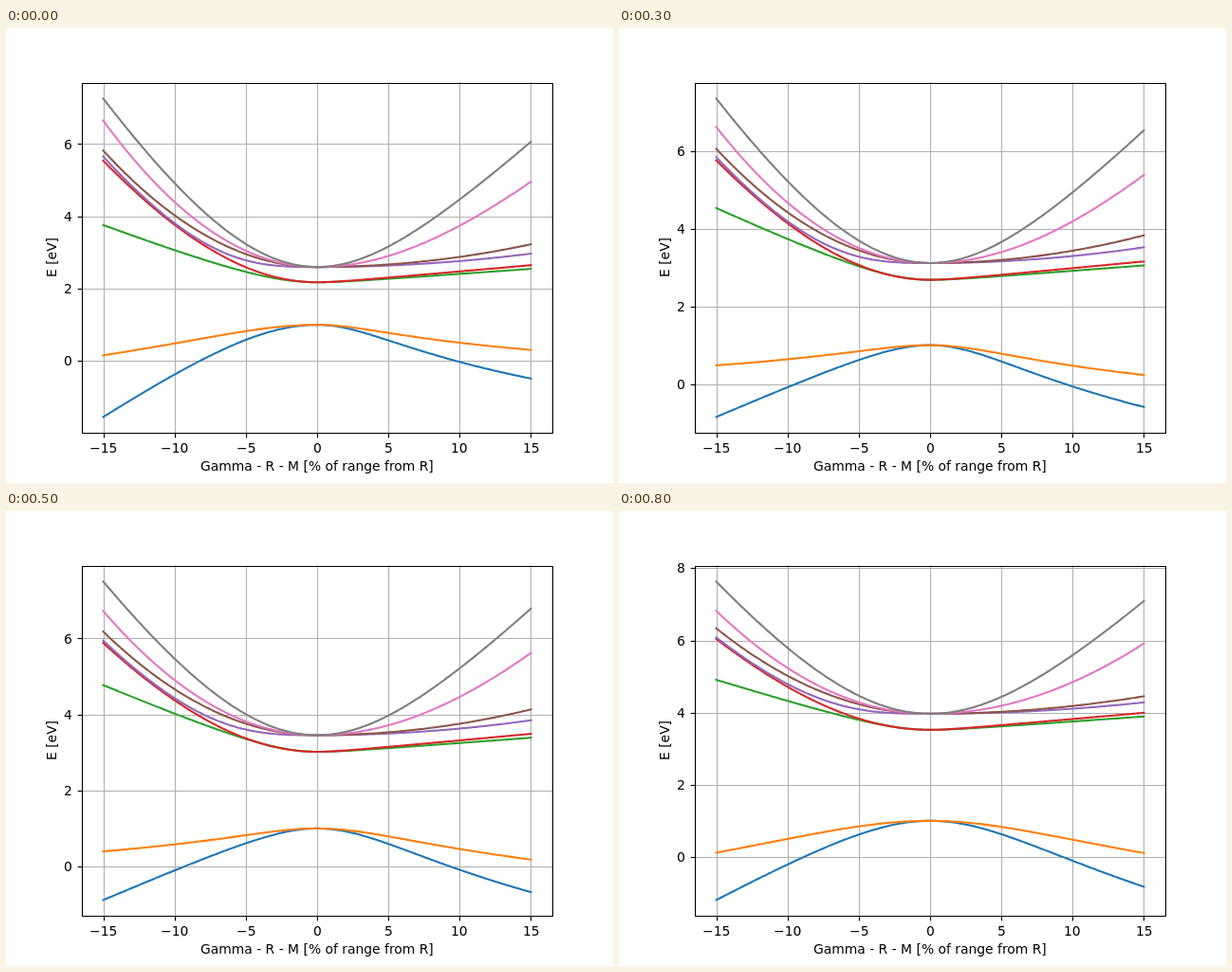
These frames come from a looping animation (640 px wide and 480 px high, 900 ms). An HTML page with a canvas:

```html
<!DOCTYPE html>
<html lang="en">
<head>
<meta charset="utf-8">
<title>Band structure near R</title>
<style>
  html, body { margin: 0; width: 100%; height: 100%; overflow: hidden; background: #fff; }
  canvas { display: block; }
</style>
</head>
<body>
<canvas id="plot" width="640" height="480"></canvas>
<script>
const ctx = document.getElementById('plot').getContext('2d');

const STEP_MS = 100, STEPS = 9;
const LEFT = 80, RIGHT = 576, TOP = 57.6, BOTTOM = 427.2;
const THIN = 1.11, THICK = 2.083, TICK = 4.86;
const REACH = 15;

// A quantity over the steps: a steady drift plus a jump that settles.
const drift = (start, speed = 0, bend = 0, jump = 0) =>
  k => start + speed * k + bend * k * k + jump * (1 - 0.671 ** k);

// Rise from 0 to 1; a larger knee makes the far part straighter or flatter.
const hyperbola = (v, knee) => v * (1 + Math.sqrt(1 + knee)) / (1 + Math.sqrt(1 + knee * v));
const saturate = (v, knee) => Math.log(1 + knee * v) / Math.log(1 + knee);

// One side of a band: energy offset at the rim, knee, and form of the rise.
const side = (rim, knee = drift(0), rise = hyperbola, power = 2) => k => {
  const height = rim(k), bend = knee(k);
  return u => height * rise(u ** power, bend);
};

// Energies at R, in eV
const valence = drift(1), lower = drift(2.178, 0.168), upper = drift(2.6, 0.171);

const bands = [
  { color: '#1f77b4', edge: valence,
    left: side(drift(-2.55, -0.157, 0, 1.68), drift(4, 4.9, -0.59)),
    right: side(drift(-1.486, -0.03, -0.0016), drift(8, -0.65), saturate) },
  { color: '#ff7f0e', edge: valence,
    left: side(drift(-0.843, -0.125, 0, 1), drift(3, 3.2, -0.42), saturate),
    right: side(drift(-0.693, -0.025), drift(11, -1.1), saturate) },
  { color: '#2ca02c', edge: lower,
    left: side(drift(1.582, -0.0215, -0.0092, 0.589), drift(7, 0.5)),
    right: side(drift(0.37), drift(60)) },
  { color: '#d62728', edge: lower,
    left: side(drift(3.36, -0.09, -0.0019), drift(0.6)),
    right: side(drift(0.472), drift(100)) },
  { color: '#9467bd', edge: upper,
    left: side(drift(3.056, -0.1064, -0.0014), drift(5, -0.1), hyperbola, 3),
    right: side(drift(0.37, 0.0234, -0.0038)) },
  { color: '#8c564b', edge: upper,
    left: side(drift(3.22, -0.0866, -0.0025)),
    right: side(drift(0.628, 0.0564, -0.0093)) },
  { color: '#e377c2', edge: upper,
    left: side(drift(4.05, 0.064, -0.0134, -0.889)),
    right: side(drift(2.36, -0.0188, -0.0041), drift(0.9, -0.1)) },
  { color: '#7f7f7f', edge: upper,
    left: side(drift(4.66, 0.0917, -0.0148, -0.816), drift(1.4)),
    right: side(drift(3.463, 0, -0.0053), drift(4, -0.19)) }
];

function energy(band, k) {
  const base = band.edge(k), left = band.left(k), right = band.right(k);
  return x => base + (x < 0 ? left : right)(Math.abs(x) / REACH);
}

const px = x => (LEFT + RIGHT) / 2 + x * (RIGHT - LEFT) / (2.2 * REACH);
const snap = v => Math.floor(v + 0.5) + 0.5;
const label = n => String(n).replace('-', '\u2212');

function line(x1, y1, x2, y2, color) {
  ctx.strokeStyle = color;
  ctx.beginPath();
  ctx.moveTo(x1, y1);
  ctx.lineTo(x2, y2);
  ctx.stroke();
}

// Text starts on a whole pixel.
function centered(text, x, y) {
  ctx.fillText(text, Math.round(x - ctx.measureText(text).width / 2), y);
}

function draw(k) {
  const curves = bands.map(b => energy(b, k));
  const min = curves[0](-REACH), max = curves[7](-REACH), pad = (max - min) * 0.05;
  const lo = min - pad, hi = max + pad;
  const py = e => BOTTOM - (e - lo) / (hi - lo) * (BOTTOM - TOP);

  ctx.fillStyle = '#fff';
  ctx.fillRect(0, 0, 640, 480);
  ctx.fillStyle = '#000';
  ctx.font = '13.889px "DejaVu Sans", sans-serif';
  ctx.lineWidth = THIN;
  ctx.lineCap = 'butt';

  for (let x = -REACH; x <= REACH; x += 5) {
    const at = snap(px(x));
    line(at, TOP, at, BOTTOM, '#b0b0b0');
    line(at, 427.5, at, 427.5 + TICK, '#000');
    centered(label(x), px(x), 448);
  }
  for (let e = Math.ceil(lo / 2) * 2; e <= hi; e += 2) {
    const at = snap(py(e));
    line(LEFT, at, RIGHT, at, '#b0b0b0');
    line(80.5 - TICK, at, 80.5, at, '#000');
    ctx.fillText(label(e), 61, Math.round(py(e) + 5.05));
  }

  ctx.lineWidth = THICK;
  ctx.lineCap = 'square';
  ctx.lineJoin = 'round';
  curves.forEach((curve, i) => {
    ctx.strokeStyle = bands[i].color;
    ctx.beginPath();
    for (let x = -REACH; x <= REACH; x += 0.125) ctx.lineTo(px(x), py(curve(x)));
    ctx.stroke();
  });

  ctx.lineWidth = THIN;
  ctx.strokeStyle = '#000';
  ctx.strokeRect(80.5, 58.5, 496, 369);

  centered('Gamma - R - M [% of range from R]', 328, 467);
  ctx.save();
  ctx.translate(53, 242);
  ctx.rotate(-Math.PI / 2);
  centered('E [eV]', 0, 0);
  ctx.restore();
}

function tick() {
  draw(Math.floor(performance.now() / STEP_MS) % STEPS);
  requestAnimationFrame(tick);
}
tick();
</script>
</body>
</html>
```
